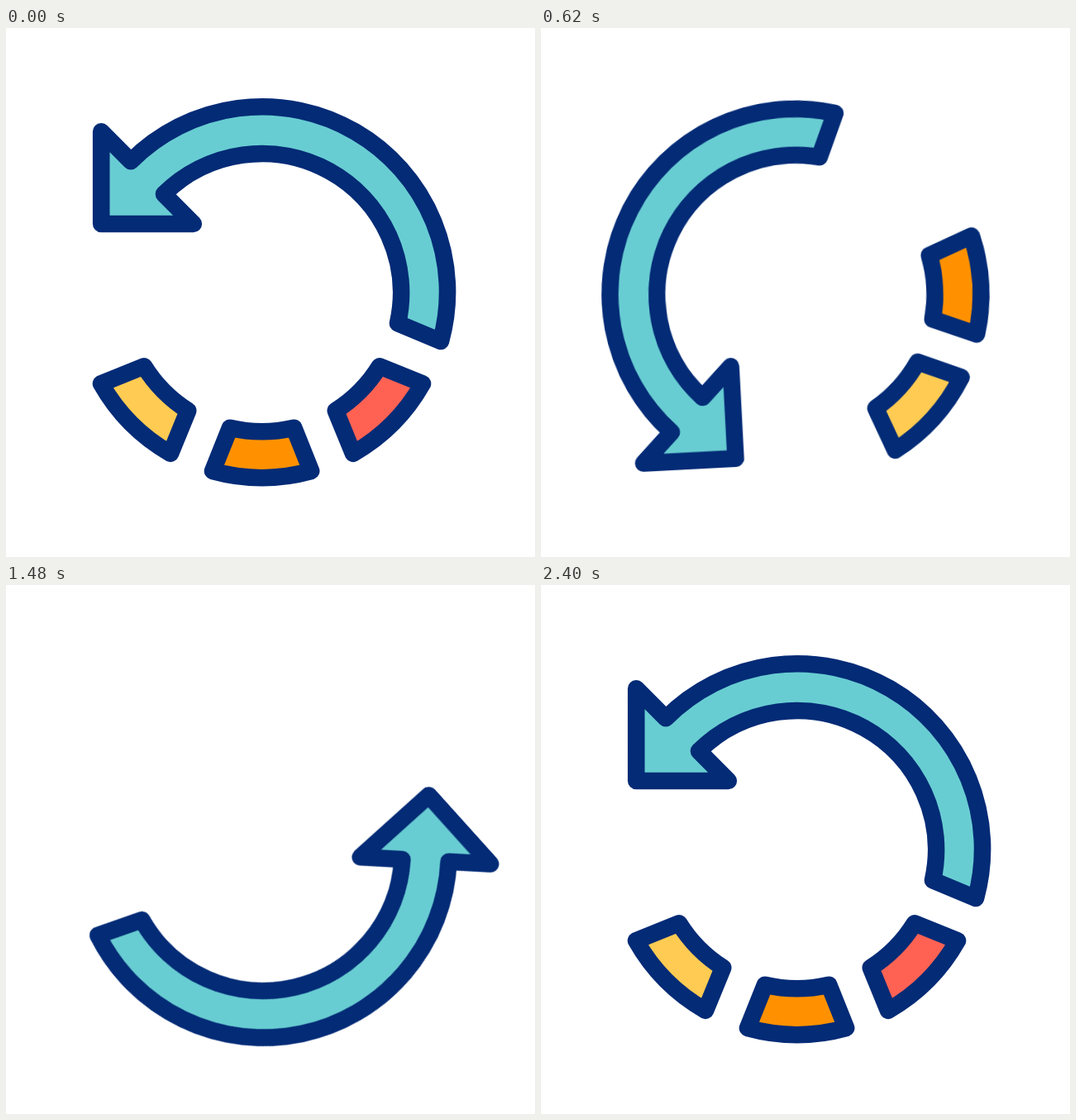
An HTML page for the animation above (2420 ms loop, 640 px wide and 640 px high).

```html
<!DOCTYPE html>
<html lang="en">
<head>
<meta charset="utf-8">
<title>Rotating arrow</title>
<style>
  html, body { margin: 0; width: 100%; height: 100%; overflow: hidden; background: #fff; }
  svg { display: block; width: 100%; height: 100%; }
  #ring {
    stroke: #032b76;
    stroke-width: 20.6;
    stroke-linejoin: round;
    transform-origin: 310px 321.8px;
  }
</style>
</head>
<body>
<svg viewBox="0 0 640 640">
  <g id="ring">
    <path fill="#68cdd2" d="M115.2 125.3 L151 161.2 A224.2 224.2 0 0 1 526 379
      L474 357.2 A168.4 168.4 0 0 0 191 200.9 L226.8 237 H115.2 Z"/>
    <path id="red" fill="#ff6253" d="M452 409.2 L504 430.3 A224.2 224.2 0 0 1 420 514.8
      L398.8 463 A168.4 168.4 0 0 0 452 409.2 Z"/>
    <path id="orange" fill="#ff9100" d="M348.3 483.7 L369.2 536 A224.2 224.2 0 0 1 250 536
      L271 483.7 A168.4 168.4 0 0 0 348.3 483.7 Z"/>
    <path id="yellow" fill="#ffcb52" d="M220.2 463 L199 514.8 A224.2 224.2 0 0 1 115 430.3
      L167 409.2 A168.4 168.4 0 0 0 220.2 463 Z"/>
  </g>
</svg>
<script>
  const LOOP = 2420, TICK = 20, STEPS = LOOP / TICK;
  const DEG_PER_TICK = 3, HIDDEN = 1080;
  const hideAt = { red: 420, orange: 840, yellow: 1260 };

  const play = (id, frames, easing = 'linear') =>
    document.getElementById(id).animate(frames, { duration: LOOP, iterations: Infinity, easing });

  play('ring', [
    { transform: 'rotate(0deg)' },
    { transform: `rotate(${-DEG_PER_TICK * STEPS}deg)` }
  ], `steps(${STEPS}, end)`);

  for (const [id, ms] of Object.entries(hideAt)) {
    const key = (opacity, time) => ({ opacity, offset: time / LOOP, easing: 'step-end' });
    play(id, [key(1, 0), key(0, ms), key(1, ms + HIDDEN), key(1, LOOP)]);
  }
</script>
</body>
</html>
```
